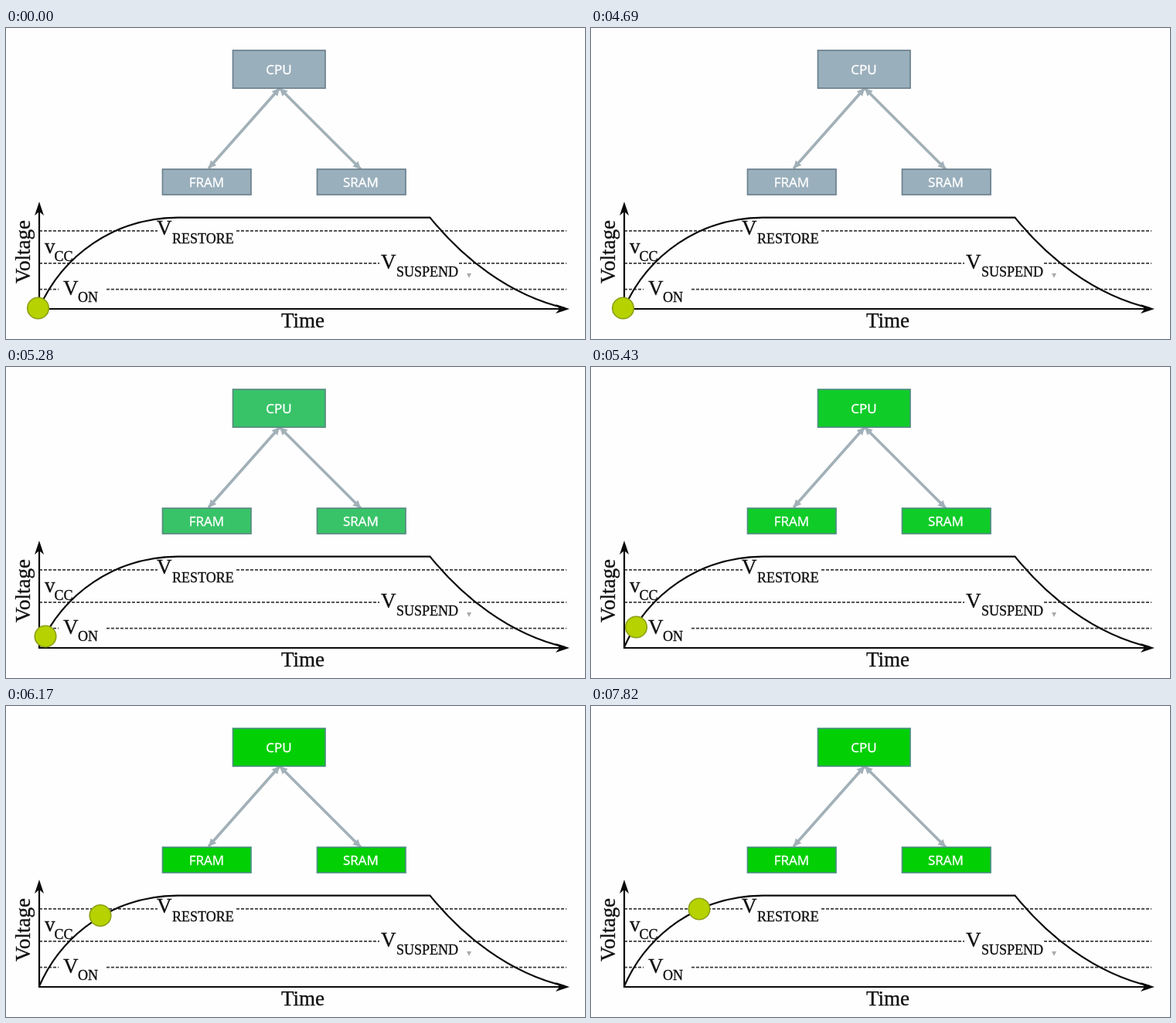
Animation of 749 by 403 pixels, one loop 8000 ms. Source, as an HTML page:

```html
<!DOCTYPE html>
<html lang="en">
<head>
<meta charset="utf-8">
<title>Voltage over time</title>
<style>
  html, body { margin: 0; width: 100%; height: 100%; overflow: hidden; background: #fefefe; }
  svg { display: block; width: 100vw; height: 100vh; }
  .box { fill: #9aafbc; stroke: #6b808e; stroke-width: 1.7; }
  .label { font: 17px "Open Sans", "Noto Sans", sans-serif; fill: #fff; stroke: #fff; stroke-width: .35; text-anchor: middle; }
  .serif { font-family: "Liberation Serif", "Times New Roman", serif; fill: #111; stroke: #111; stroke-width: .35; }
  .big { font-size: 27px; }
  .sub { font-size: 18px; }
  .axis { font-size: 27px; }
  .line { fill: none; stroke: #0a0a0a; stroke-width: 2.2; }
  .dash { fill: none; stroke: #3c3c3c; stroke-width: 1.8; stroke-dasharray: 4 2; }
  .link { stroke: #a2b0b8; stroke-width: 3.6; }
  #ball { fill: #b6d200; stroke: #8c9f16; stroke-width: 1.6; }
</style>
</head>
<body>
<svg viewBox="0 0 749 403">
  <defs>
    <marker id="tip" viewBox="0 0 10 10" refX="10" refY="5" markerWidth="10" markerHeight="11"
            markerUnits="userSpaceOnUse" orient="auto-start-reverse">
      <path d="M0 0L10 5L0 10Z" fill="#a2b0b8"/>
    </marker>
  </defs>

  <g class="link">
    <path d="M354 78L262 182" marker-start="url(#tip)" marker-end="url(#tip)"/>
    <path d="M354 78L459 183" marker-start="url(#tip)" marker-end="url(#tip)"/>
  </g>

  <g id="boxes" class="box">
    <rect x="293.5" y="29" width="119.5" height="49"/>
    <rect x="202.5" y="183" width="114.5" height="33"/>
    <rect x="402.5" y="183" width="114.5" height="33"/>
  </g>
  <g class="label">
    <text x="353" y="60">CPU</text>
    <text x="259.5" y="206">FRAM</text>
    <text x="459" y="206">SRAM</text>
  </g>

  <path class="dash" d="M43 262.8H196M298 262.8H725M43 304.8H483M586 304.8H725M43 338.6H68M130 338.6H725"/>
  <path class="line" d="M43 238V364H716"/>
  <path d="M43 225L49 243L43 238L37 243ZM729 364L711 370L716 364L711 358Z" fill="#0a0a0a"/>
  <path class="line" d="M43 363C73 295 140 246 222 245.6H548.5C590 297 650 346 723 363"/>
  <path d="M596 318H602L599 324Z" fill="#aaa"/>

  <g class="serif">
    <g class="big">
      <text x="195" y="267.5">V</text>
      <text x="485" y="311.5">V</text>
      <text x="74" y="345.5">V</text>
      <text x="50" y="292">v</text>
    </g>
    <g class="sub">
      <text x="215" y="278.5">RESTORE</text>
      <text x="505" y="322">SUSPEND</text>
      <text x="93" y="354.5">ON</text>
      <text x="62.5" y="302">CC</text>
    </g>
    <g class="axis">
      <text x="356" y="388">Time</text>
      <text transform="translate(31 331) rotate(-90)">Voltage</text>
    </g>
  </g>

  <circle id="ball" r="13.8" cx="41.5" cy="363"/>
</svg>
<script>
  const LOOP = 8000;
  const GREY = ["#9aafbc", "#6b808e"], GREEN = ["#02cf04", "#4c9080"];

  // start time, ball x, ball y
  const steps = [
    [0, 41.5, 363], [4840, 42, 362.3], [4990, 43.5, 360.5], [5140, 46.5, 356],
    [5280, 51, 349], [5430, 58.5, 337], [5570, 68, 324], [5720, 79, 310],
    [5870, 92.5, 296], [6020, 107.5, 282.5], [6170, 122, 271.5],
    [6320, 133, 266], [6470, 138.5, 263.7], [6620, 140, 263]
  ];
  // start time, fill and stroke of the boxes
  const tints = [
    [0, ...GREY], [5140, "#76b89a", "#648680"], [5280, "#38c368", "#588a80"],
    [5430, "#0fcc28", "#508e80"], [5570, ...GREEN]
  ];

  const ball = document.getElementById("ball");
  const boxes = document.getElementById("boxes");
  const current = (list, t) => list.findLast(([start]) => start <= t);

  function draw() {
    const t = performance.now() % LOOP;
    const [, x, y] = current(steps, t);
    const [, fill, stroke] = current(tints, t);
    ball.setAttribute("cx", x);
    ball.setAttribute("cy", y);
    boxes.style.fill = fill;
    boxes.style.stroke = stroke;
    requestAnimationFrame(draw);
  }
  draw();
</script>
</body>
</html>
```
